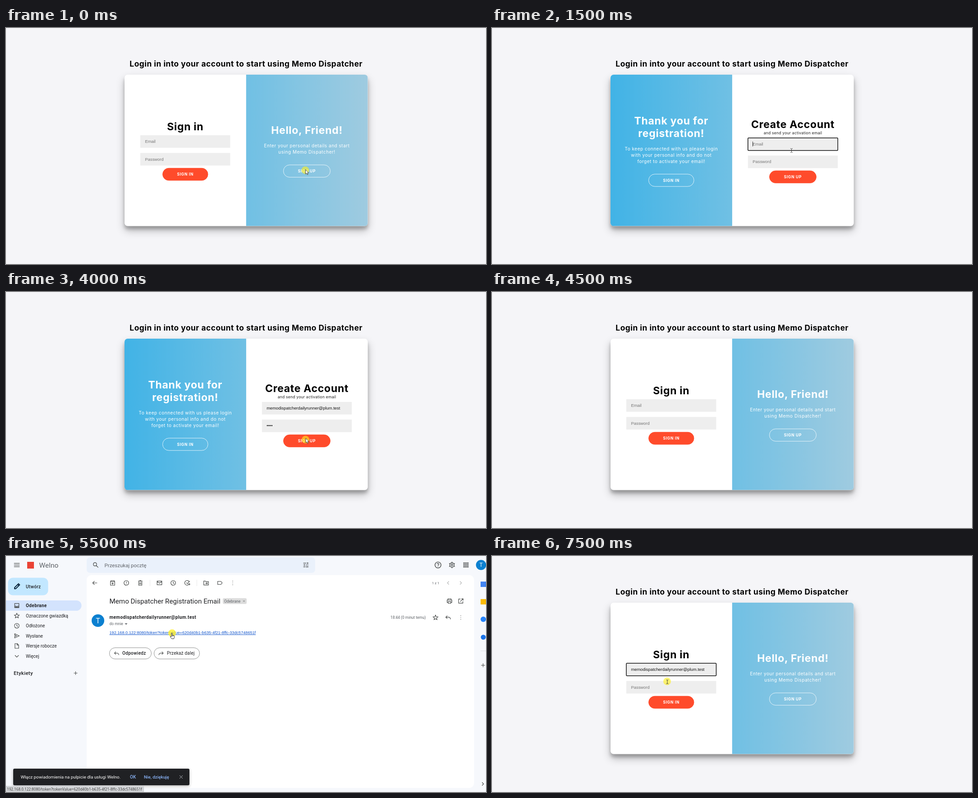
Recreate the animation shown at these times as an HTML page. Size 1065 px wide and 526 px high, loop 8 s.

```html
<!DOCTYPE html>
<html lang="en">
<head>
<meta charset="utf-8">
<title>Registration walkthrough</title>
<style>
html, body { margin: 0; width: 100%; height: 100%; overflow: hidden; background: #f5f5f8; }
svg { display: block; width: 1065px; height: 526px; }
text { white-space: pre; }
.mid { text-anchor: middle; }
.head { font: 700 17.3px Inter, sans-serif; letter-spacing: .52px; }
.title { font: 700 23px Inter, sans-serif; letter-spacing: .7px; }
.para { font: 400 10px Inter, sans-serif; letter-spacing: .52px; }
.note { font: 400 8.6px Inter, sans-serif; letter-spacing: .2px; fill: #222; }
.btn { font: 700 8.5px Inter, sans-serif; letter-spacing: .7px; fill: #fff; }
.input { font: 9.37px "Liberation Sans", Arial, sans-serif; }
.ui { font: 400 10px Roboto, sans-serif; fill: #202124; }
.small { font-size: 8.44px; fill: #5f6368; }
.medium { font-weight: 500; letter-spacing: .3px; }
.bold { font-weight: 700; letter-spacing: .4px; }
.white { fill: #fff; }
.pop { font: 600 8px "Open Sans", sans-serif; }
.icon { fill: none; stroke: #444746; stroke-width: 2; }
</style>
</head>
<body>
<svg id="stage" viewBox="0 0 1065 526"></svg>
<script>
const stage = document.getElementById('stage');
const LOOP = 8000;
const APP = 'Memo Dispatcher';
const EMAIL = 'memodispatcherdailyrunner@plum.test';
const MAIL_APP = 'Welno';
const LINK = '192.168.0.122:8080/token?tokenValue=620d40b1-b635-4f21-8ffc-33dc5748651f';
const LEFT = 397.8, RIGHT = 667.5;

const text = (x, y, cls, value, attrs = '') =>
  `<text x="${x}" y="${y}" class="${cls}" ${attrs}>${value}</text>`;
const rect = (x, y, w, h, fill, r = 0, attrs = '') =>
  `<rect x="${x}" y="${y}" width="${w}" height="${h}" rx="${r}" fill="${fill}" ${attrs}/>`;
const circle = (x, y, r, fill, attrs = '') =>
  `<circle cx="${x}" cy="${y}" r="${r}" fill="${fill}" ${attrs}/>`;
const lines = (x, y, step, cls, rows) =>
  rows.map((row, i) => text(x, y + i * step, cls, row)).join('');

// Icons live in a 24 unit box.
const ring = r => `M12 ${12 - r}a${r} ${r} 0 1 0 .01 0z`;
const dot = (x, y) => `M${x - 1} ${y}h2`;
const ICONS = {
  menu: 'M2 6h20M2 12h20M2 18h20',
  search: 'M9.5 3.5a6 6 0 1 0 .01 0zM14 14l7 7',
  tune: 'M2 5h11M17 5h5M17 2v6M2 12h5M11 12h11M7 9v6M2 19h9M15 19h7M15 16v6',
  help: ring(10) + 'M9 9.5a3 3 0 1 1 4.5 2.6q-1.5 1-1.5 2.6M12 16.5v2',
  gear: ring(7.5) + ring(3) + 'M12 1v4M12 19v4M2.5 6.5l3.5 2M18 15.5l3.5 2M2.5 17.5l3.5-2M18 8.5l3.5-2',
  apps: [5, 12, 19].flatMap(y => [5, 12, 19].map(x => `M${x - 2} ${y - 1}h4v2h-4z`)).join(''),
  back: 'M21 12H5M11 5l-7 7 7 7',
  archive: 'M4 7h16v14H4zM4 7l2-4h12l2 4M12 10v7M8.5 13.5l3.5 3.5 3.5-3.5',
  report: ring(9) + 'M12 7v6M12 15v2',
  trash: 'M6 7v14h12V7M4 5h16M9 3h6M10 10v8M14 10v8',
  mail: 'M3 5h18v14H3zM3 7l9 6 9-6',
  clock: ring(9) + 'M12 6v6l4 3',
  task: 'M19 8a9 9 0 1 0-3 11M8 11l4 4 9-10M19 13v8M15 17h8',
  folder: 'M3 5h6l2 2h10v13H3zM9 13.5h8M13.5 10l3.5 3.5-3.5 3.5',
  label: 'M3 6h12l5 6-5 6H3z',
  more: dot(12, 5) + dot(12, 12) + dot(12, 19),
  prev: 'M15 6l-6 6 6 6',
  next: 'M9 6l6 6-6 6',
  down: 'M5 9l7 7 7-7',
  print: 'M6 8V3h12v5M6 17H3V8h18v9h-3M7 14h10v7H7z',
  open: 'M11 4H4v16h16v-7M14 3h7v7M21 3L10 14',
  star: 'M12 3l2.7 6 6.5.6-5 4.3 1.5 6.4L12 17l-5.700 3.300 1.500-6.400-5-4.300 6.500-.6z',
  reply: 'M9 5l-6 6 6 6M3 11h11q6 0 7 8',
  forward: 'M15 5l6 6-6 6M21 11H10q-6 0-7 8',
  inbox: 'M4 4h16v16H4zM4 14h5q3 5 6 0h5M5 16v3h14v-3M5 18h14',
  send: 'M4 4l17 8-17 8v-6l8-2-8-2z',
  doc: 'M5 3h9l5 5v13H5zM13 3v6h6',
  plus: 'M12 4v16M4 12h16',
  close: 'M5 5l14 14M19 5L5 19',
  pencil: 'M4 20v-4L15 5l4 4L8 20zM16 4l2-2 4 4-2 2',
  box: 'M4 4h16v16H4z',
  refresh: 'M19 7a8.500 8.500 0 1 0 1.500 7M20 3v6h-6'
};
const icon = (name, x, y, size = 14, attrs = '') =>
  `<path class="icon" d="${ICONS[name]}" transform="translate(${x - size / 2} ${y - size / 2}) scale(${size / 24})" ${attrs}/>`;

const POINTERS = {
  arrow: '<path d="M0 0v10l2.300-2 1.700 3.500 1.600-.8-1.600-3.300h3z" fill="#fff" stroke="#222" stroke-width=".8"/>',
  beam: '<path d="M-2.500-4.500q2 0 2.500 1 .5-1 2.500-1M0-3.500v7M-2.500 4.500q2 0 2.500-1 .5 1 2.500 1" fill="none" stroke="#333" stroke-width=".9"/>',
  hand: '<path d="M-2-6q1.200-1.200 2 0v4.500l4 1q1 .5.800 2L3.500 6.500H-1.500L-4.500 2q-.5-1.500 1-1L-2 2zM0-1.500V1M2-1V1" fill="#fff" stroke="#222" stroke-width=".9"/>'
};
const pointer = (kind, x, y, glow = 0, dy = 0) =>
  circle(x - .5, y + dy, 8.5, '#fff01f', `opacity="${glow}"`) +
  `<g transform="translate(${x} ${y})">${POINTERS[kind]}</g>`;

function field(x, y, label, { value = '', focus = false, caret = false } = {}) {
  const dots = label === 'Password';
  const caretX = x + 10.5 + (dots ? value.length * 3.28 : 0);
  return rect(x, y, 199.5, 28, '#eee') +
    text(x + 10.5, y + 17, 'input', value || label, `fill="${value ? '#111' : '#757575'}"`) +
    (focus ? rect(x, y, 199.5, 28, 'none', 1.5, 'stroke="#101010" stroke-width="1.5"') : '') +
    (caret ? rect(caretX - .3, y + 8, .8, 11, '#111') : '');
}

const button = (cx, y, w, label, ghost) =>
  rect(cx - w / 2, y, w, 27.5, ghost ? 'none' : '#ff4b2b', 13.75,
    `stroke="${ghost ? '#fff' : '#ff4b2b'}" stroke-width=".8"`) +
  text(cx, y + 16.9, 'btn mid', label);

const card = panelX => `
  <defs>
    <linearGradient id="sky" gradientUnits="userSpaceOnUse" x1="263" x2="803" y1="0" y2="0">
      <stop stop-color="#41b3e6"/><stop offset=".5" stop-color="#70c0e4"/><stop offset="1" stop-color="#9fcbe0"/>
    </linearGradient>
    <clipPath id="round">${rect(263, 104, 539.7, 337.5, '#000', 7)}</clipPath>
  </defs>` +
  rect(0, 0, 1065, 526, '#f5f5f8') +
  text(532.7, 86, 'head mid', `Login in into your account to start using ${APP}`) +
  rect(263, 113.8, 539.7, 337.5, '#000', 7, 'opacity=".25" style="filter:blur(9.8px)"') +
  rect(263, 111, 539.7, 337.5, '#000', 7, 'opacity=".22" style="filter:blur(3.5px)"') +
  rect(263, 104, 539.7, 337.5, '#fff', 7) +
  rect(panelX, 104, 269.9, 337.5, 'url(#sky)', 0, 'clip-path="url(#round)"');

const signIn = (email = {}) => card(532.8) +
  text(LEFT, 228, 'title mid', 'Sign in') +
  field(298, 239, 'Email', email) +
  field(298, 278.5, 'Password') +
  button(LEFT, 312.3, 100.5, 'SIGN IN') +
  text(RIGHT, 236, 'title mid white', 'Hello, Friend!') +
  lines(RIGHT, 266, 14.1, 'para mid white', ['Enter your personal details and start', `using ${APP}!`]) +
  button(RIGHT, 305.1, 104, 'SIGN UP', true);

const signUp = (email = {}, password = {}) => card(263) +
  lines(LEFT, 215, 27.8, 'title mid white', ['Thank you for', 'registration!']) +
  lines(LEFT, 273, 14.1, 'para mid white',
    ['To keep connected with us please login', 'with your personal info and do not', 'forget to activate your email!']) +
  button(LEFT, 325.7, 100.5, 'SIGN IN', true) +
  text(RIGHT, 223, 'title mid', 'Create Account') +
  text(RIGHT, 237, 'note mid', 'and send your activation email') +
  field(567.8, 245, 'Email', email) +
  field(567.8, 284.3, 'Password', password) +
  button(RIGHT, 318.1, 104, 'SIGN UP');

const popup = () =>
  rect(631, -6, 236, 68, '#bbb', 2, 'style="filter:blur(1.5px)"') +
  rect(631.5, -6, 235, 67.5, '#fff', 2, 'stroke="#c4c4c4"') +
  rect(632, 28, 234, 33, '#f1f1f1') + rect(632, 28, 234, .8, '#ddd') +
  text(674, 13.8, 'pop mid', 'angielski', 'fill="#1a7bd0"') +
  text(731, 13.8, 'pop mid', 'polski', 'fill="#555"') +
  rect(643, 20, 62, 1.5, '#1a7bd0') + rect(705, 20.5, 52, .8, '#ddd') +
  icon('more', 824, 11) + icon('close', 846.5, 11, 10) +
  text(643, 48, 'ui', 'Fennow Rephraser', 'style="font-size:8.2px;fill:#777"');

function mailFrame() {
  const folders = [['inbox', 'Odebrane'], ['star', 'Oznaczone gwiazdką'], ['clock', 'Odłożone'],
    ['send', 'Wysłane'], ['doc', 'Wersje robocze'], ['down', 'Więcej']];
  return rect(0, 0, 1065, 526, '#f6f8fc') +
    icon('menu', 24, 20, 15) + rect(47, 13, 15, 15, '#ea4335') +
    text(73.5, 26, 'ui', MAIL_APP, 'style="font-size:15.5px;fill:#5f6368"') +
    rect(179, 3, 507, 34.5, '#eaf1fb', 17.2 / 2.4) + icon('search', 199, 20, 15) +
    text(218.5, 24.5, 'ui', 'Przeszukaj pocztę', 'style="font-size:11.5px;fill:#5f6368"') +
    icon('tune', 665.5, 20) + icon('help', 958.5, 20, 16) + icon('gear', 989.5, 20, 16) + icon('apps', 1020.5, 20) +
    circle(1054, 20, 11.3, '#0b80d0') + text(1054, 24.3, 'ui mid white', 'T', 'style="font-size:12px;fill:#fff"') +
    rect(4.5, 48.5, 89, 39, '#c2e7ff', 11) + icon('pencil', 24, 68, 15, 'style="stroke:#001d35;stroke-width:3"') +
    text(44, 71.8, 'ui medium', 'Utwórz') +
    '<path d="M0 99h156a11.500 11.500 0 0 1 0 23H0z" fill="#d3e3fd"/>' +
    folders.map(([name, label], i) =>
      icon(name, 24, 110.5 + i * 22.5) + text(44, 114 + i * 22.5, i ? 'ui' : 'ui bold', label)).join('') +
    text(17, 264.8, 'ui medium', 'Etykiety', 'style="font-size:11.5px"') + icon('plus', 154.5, 261, 12) +
    rect(179, 42.500, 859.500, 474.500, '#fff', 11) +
    text(945, 63, 'ui small', '1 z 1', 'style="font-size:7.8px"') +
    icon('prev', 981, 60, 14, 'opacity=".4"') + icon('next', 1009, 60, 14, 'opacity=".4"') +
    rect(1053, 57, 12, 12, '#4285f4') + rect(1053, 96, 12, 12, '#fbbc04') +
    circle(1059, 141, 6, '#2684fc') + circle(1059, 181, 5.5, '#1a73e8') +
    rect(1053, 211, 12, .8, '#dadce0') + icon('plus', 1058.500, 243.500, 13) + icon('next', 1058, 508, 14);
}

const toast = () => rect(16, 476, 391, 37, '#000', 3, 'opacity=".3" style="filter:blur(3px)"') +
  rect(16, 474, 391, 37, '#202124', 3) +
  text(32.5, 496, 'ui', `Włącz powiadomienia na pulpicie dla usługi ${MAIL_APP}.`, 'style="font-size:9.800px;fill:#fff"') +
  text(275, 496, 'ui', 'OK', 'style="font-weight:500;fill:#8ab4f8"') +
  text(306, 496, 'ui', 'Nie, dziękuję', 'style="font-weight:500;font-size:9.800px;fill:#8ab4f8"') +
  icon('close', 388.500, 492.500, 12, 'style="stroke:#bdc1c6"');

const inbox = () => mailFrame() +
  icon('box', 200, 60) + icon('refresh', 237, 60) + icon('more', 268, 60) +
  rect(179, 77, 859.500, .7, '#e4e6e9') + rect(179, 105, 859.500, .7, '#e4e6e9') +
  icon('box', 200, 91, 13, 'opacity=".4"') + icon('star', 221, 91, 13, 'opacity=".4"') +
  text(238, 94.500, 'ui bold', 'memodispatcherdaily.') +
  text(356, 94.500, 'ui bold', `${APP} Registration Email`) +
  text(1000, 94.500, 'ui bold', '18:44', 'style="font-size:8.400px"') + toast();

const letter = () => mailFrame() +
  [['back', 197], ['archive', 236.5], ['report', 267], ['trash', 298], ['mail', 340.5], ['clock', 371],
    ['task', 402.5], ['folder', 444], ['label', 475], ['more', 503]].map(([name, x]) => icon(name, x, 60)).join('') +
  rect(319, 53, .7, 14, '#e0e0e0') + rect(423, 53, .7, 14, '#e0e0e0') +
  text(229.5, 106, 'ui', `${APP} Registration Email`, 'style="font-size:15.200px"') +
  rect(481, 94, 53, 13, '#ddd', 3) + text(484, 103.500, 'ui small', 'Odebrane') + icon('close', 528, 100.500, 7) +
  icon('print', 984, 100.500) + icon('open', 1009, 100.500) +
  circle(204, 144, 14, '#0b80d0') + text(204, 149.800, 'ui mid', 'T', 'style="font-size:16px;fill:#fff"') +
  text(229.5, 140, 'ui bold', EMAIL) +
  text(229.5, 153.800, 'ui small', 'do mnie') + '<path d="M263.500 150h6l-3 3.200z" fill="#5f6368"/>' +
  text(853, 139.800, 'ui small', '18:44 (0 minut temu)') +
  icon('star', 953, 137) + icon('reply', 981, 137) + icon('more', 1009, 137) +
  text(229.5, 174, 'input', LINK, 'style="font-size:9.140px" fill="#1155cc" text-decoration="underline"') +
  rect(229.5, 204.500, 93, 25, '#fff', 12.500, 'stroke="#747775" stroke-width=".8"') +
  rect(328.5, 204.500, 101, 25, '#fff', 12.500, 'stroke="#747775" stroke-width=".8"') +
  icon('reply', 245.500, 217, 13) + icon('forward', 344, 217, 13) +
  text(258, 220.300, 'ui medium', 'Odpowiedz') + text(357, 220.300, 'ui', 'Przekaż dalej', 'letter-spacing=".2"') +
  toast() +
  rect(-1, 513, 306.500, 14, '#d5d7da', 1, 'stroke="#bfc1c4" stroke-width=".7"') +
  text(2, 522.800, 'pop', LINK, 'style="font-weight:400;font-size:8.150px" fill="#333"');

const typed = { value: EMAIL };
const active = { focus: true, caret: true };
const secret = n => ({ ...active, value: '•'.repeat(n) });
const steps = [
  [0, () => signIn() + pointer('arrow', 664.5, 315.5, .6, 1.500)],
  [500, () => signUp() + pointer('beam', 664, 267, .62, -.5)],
  [1000, () => signUp(active) + pointer('beam', 664.5, 267)],
  [1500, () => signUp(active) + pointer('beam', 664.5, 273)],
  [2000, () => signUp({ ...typed, focus: true }) + pointer('beam', 665, 300, .62)],
  [2500, () => signUp(typed, active) + pointer('beam', 665, 300)],
  [3000, () => signUp(typed, secret(1)) + pointer('beam', 665, 300)],
  [3500, () => signUp(typed, secret(2)) + pointer('beam', 665, 300)],
  [4000, () => signUp(typed, { value: '••••' }) + pointer('arrow', 665, 326, .6, 3)],
  [4500, () => signIn()],
  [5000, inbox],
  [5500, () => letter() + pointer('hand', 369, 178, .75, -6)],
  [6000, () => signIn() + popup() + pointer('beam', 369.5, 249.5, .45)],
  [6500, () => signIn(active) + pointer('beam', 369.5, 249.5, .3)],
  [7500, () => signIn({ ...typed, focus: true }) + pointer('beam', 389, 280.5, .62, -1)]
];

let shown;
function frame() {
  const now = performance.now() % LOOP;
  const step = steps.findLast(([start]) => start <= now);
  if (step !== shown) stage.innerHTML = step[1]();
  shown = step;
  requestAnimationFrame(frame);
}
frame();
</script>
</body>
</html>
```
